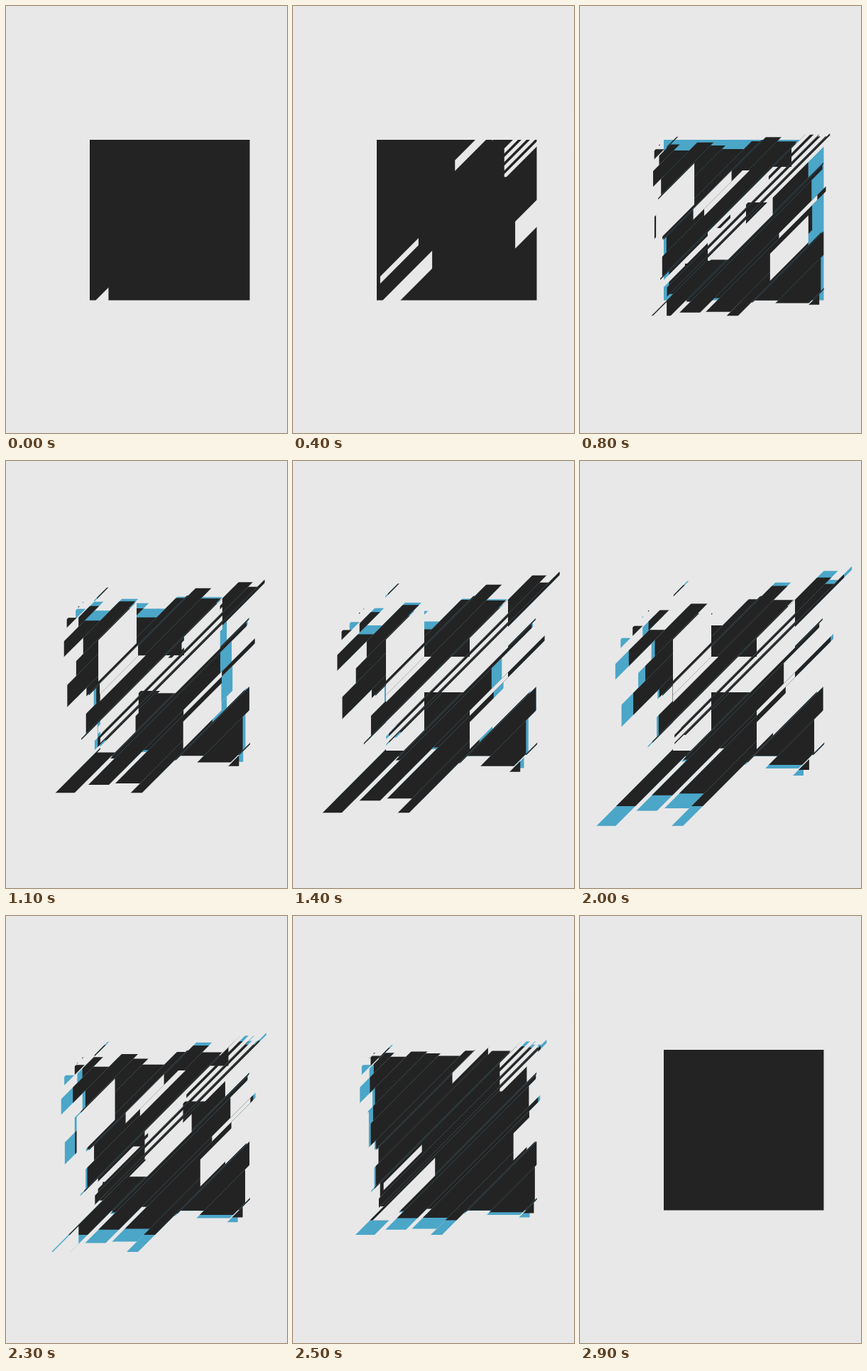
An HTML page with a canvas for the animation above (3100 ms loop, 396 px wide and 600 px high).

```html
<!DOCTYPE html>
<html lang="en">
<head>
<meta charset="utf-8">
<title>Sliced square</title>
<style>
html, body { margin: 0; width: 100%; height: 100%; overflow: hidden; background: #e8e8e8; }
canvas { display: block; }
</style>
</head>
<body>
<canvas id="stage" width="396" height="600"></canvas>
<script>
const ctx = document.getElementById('stage').getContext('2d');
const LOOP = 3100, STEP = 100, LAG = 200;
const PAPER = '#e8e8e8', INK = '#232323', CYAN = '#4ba6c8';

const SQUARE = [118, 188, 225.5, 225.5];
const LEFT = [131, 195, 54, 212], RIGHT = [249, 195, 54, 212], BAR = [185, 275, 64, 50];
const LETTER = [LEFT, BAR, RIGHT];

const clamp = v => Math.min(1, Math.max(0, v));
const progress = (t, from, to) => clamp((t - from) / (to - from));
const smooth = u => (1 - Math.cos(Math.PI * u)) / 2;

function seeded(seed) {
  return () => (seed = (seed * 16807) % 2147483647) / 2147483647;
}

// The square is cut into diagonal bands of x + y; each has an upper bound
// and a slide towards the top right. Thin slivers break off between them.
function makeSlices() {
  const wide = [
    [320, -49], [335, -24], [357, -55], [380, -14], [401, -29], [432, -48],
    [444, -7], [468, 14], [496, -8], [518, 27], [531, 17], [536, 32],
    [563, -80], [571, -7], [600, -63], [607, 11], [642, -60], [658, -80],
    [693, -1], [740, -15], [757, -23]
  ];
  const random = seeded(11), slices = [];
  let from = 306;
  for (const [to, slide] of wide) {
    if (random() < 0.35) {
      slices.push({ from, to: from + 2, slide: 20 - 100 * random() });
      from += 2;
    }
    slices.push({ from, to, slide });
    from = to;
  }
  return slices;
}

// Bands of the letter fly in along the diagonal from the left (-) or right (+).
function makeCuts() {
  const cut = (from, to, reach, parts = LETTER) => ({ from, to, reach, parts });
  const cuts = [
    cut(382, 440, -0.76, [LEFT]),
    cut(445, 460, 0.91, [LEFT]),
    cut(460, 470, 1.4, [LEFT, BAR]),
    cut(503, 513, -1.18),
    cut(538, 563, -2, [LEFT]),
    cut(540, 565, -1, [BAR, RIGHT]),
    cut(600, 607, 1, [RIGHT]),
    cut(616, 654, 0.6, [RIGHT])
  ];
  for (let i = 0; i < 4; i++) cuts.push(cut(498 + 12 * i, 505 + 12 * i, 1.56));
  return cuts;
}

const slices = makeSlices(), cuts = makeCuts();

function spreadAt(t) {
  const out = 1 - (1 - progress(t, 600, 1750)) ** 1.2;
  const back = (1 - progress(t, 1750, 2700)) ** 1.3;
  return 1.33 * out * back;
}

function distanceAt(t) {
  return 161 * (1 - smooth(progress(t, -100, 1170))) + 180 * smooth(progress(t, 2020, 2900));
}

function band({ from, to }, shift, rects) {
  ctx.save();
  ctx.beginPath();
  ctx.moveTo(from + 100, -100);
  ctx.lineTo(to + 100, -100);
  ctx.lineTo(to - 700, 700);
  ctx.lineTo(from - 700, 700);
  ctx.clip();
  ctx.translate(shift, -shift);
  ctx.beginPath();
  for (const r of rects) ctx.rect(...r);
  ctx.fill();
  ctx.restore();
}

function slicedSquare(color, spread) {
  ctx.fillStyle = color;
  if (spread === 0) ctx.fillRect(...SQUARE);
  else for (const s of slices) band(s, s.slide * spread, [SQUARE]);
}

function draw(t) {
  const spread = spreadAt(t), lagging = spreadAt(t - LAG), distance = distanceAt(t);
  ctx.fillStyle = PAPER;
  ctx.fillRect(0, 0, 396, 600);
  if (spread || lagging) slicedSquare(CYAN, lagging);
  slicedSquare(INK, spread);
  ctx.fillStyle = PAPER;
  for (const c of cuts) band(c, c.reach * distance, c.parts);
}

const start = performance.now();
function tick() {
  const t = (performance.now() - start) % LOOP;
  draw(Math.floor(t / STEP) * STEP);
  requestAnimationFrame(tick);
}
tick();
</script>
</body>
</html>
```
